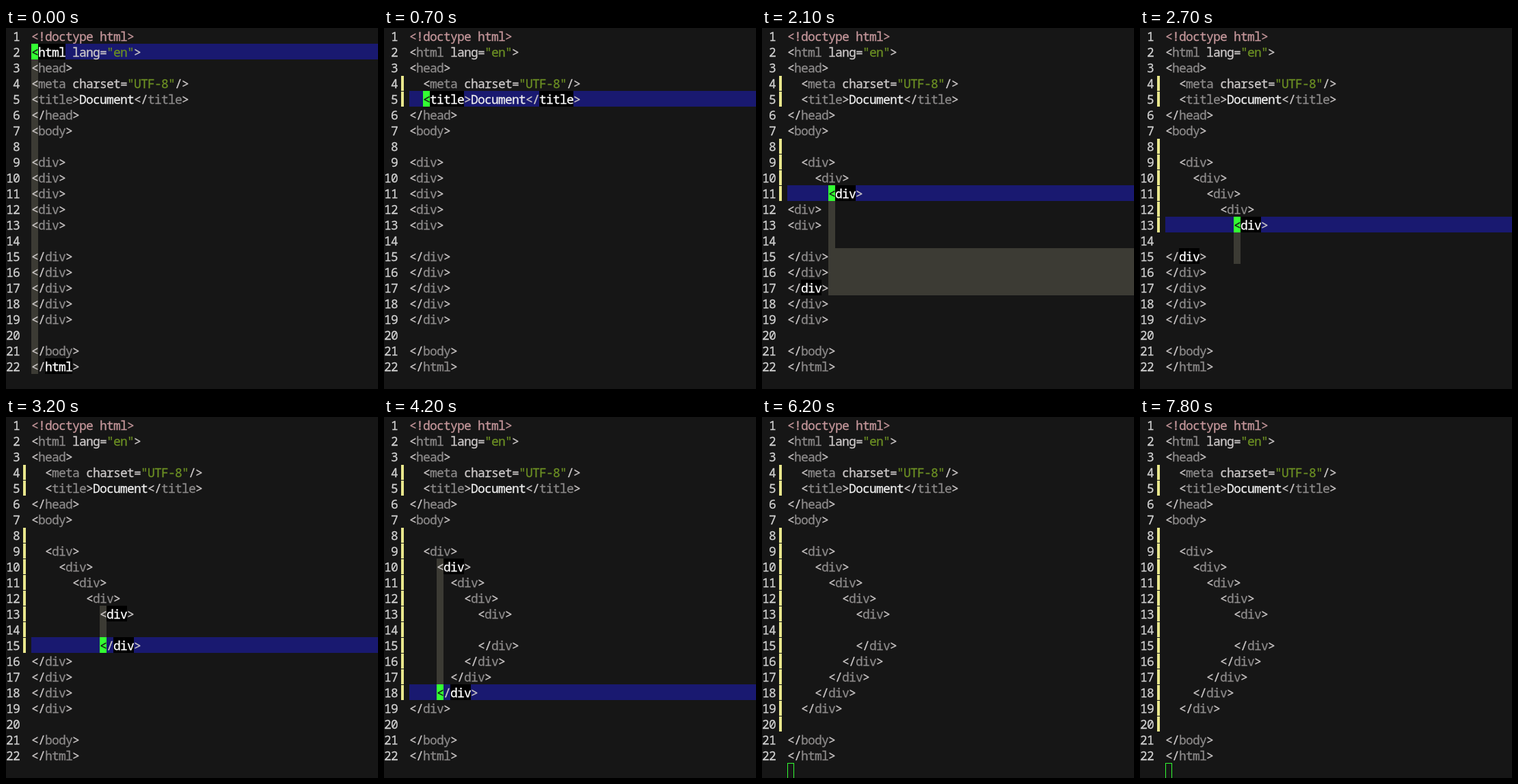
An HTML page for the animation above (7.9 s loop, 544 by 528 pixels).

```html
<!DOCTYPE html>
<html lang="en">
<head>
<meta charset="UTF-8">
<title>Indenting line by line</title>
<style>
html, body { margin: 0; width: 100%; height: 100%; overflow: hidden; background: #161616; }
#editor {
  position: relative; width: 544px; height: 528px; overflow: hidden;
  font: 18px/25px "Noto Sans Mono", "DejaVu Sans Mono", monospace;
  letter-spacing: calc(10px - 1ch);
  -webkit-text-stroke: 0.3px;
  white-space: pre; color: #cdc9c9;
}
.row { position: absolute; left: 0; width: 544px; height: 23px; }
.row > * { position: absolute; top: 0; height: 23px; }
.num { left: 0; width: 20px; text-align: right; color: #d0d0d0; }
.row > .bar { left: 25px; top: 1px; width: 4px; height: 22px; background: #e9e78c; }
.code { left: 37px; }
.here { left: 37px; right: 0; background: #191970; }
.guide { background: #3c3b34; }
.cursor { background: #3f3; color: #161616; width: 10px; }
.hollow { box-sizing: border-box; background: none; border: 1px solid #3f3; }
.name { color: #8b8989; }
.hot { display: inline-block; height: 23px; vertical-align: top; color: #fff; background: #000; }
.string { color: #6b8e23; }
.text { color: #eee; }
.doctype { color: #c4969a; }
</style>
</head>
<body>
<div id="editor"></div>
<script>
const LOOP = 7900, ROW = 23, CELL = 10, LEFT = 37;
const open = Array(5).fill("<div>"), close = Array(5).fill("</div>");
const lines = [
  "<!doctype html>", '<html lang="en">', "<head>", '<meta charset="UTF-8"/>',
  "<title>Document</title>", "</head>", "<body>", "", ...open, "", ...close,
  "", "</body>", "</html>"
];
// Arrival time of the cursor on lines 2 to 23
const moves = [0, 150, 450, 650, 850, 1150, 1350, 1550, 1850, 2050, 2350,
  2550, 2850, 3050, 3350, 3650, 3950, 4250, 4550, 4850, 4950, 5250];
const BLUR = 5750;
const editor = document.getElementById("editor");

function indent(n) {
  if (n === 4 || n === 5 || n === 8 || n === 20) return 2;
  return n > 8 && n < 20 ? 12 - 2 * Math.abs(14 - n) : 0;
}

function partner(n) {
  if (n === 5) return 5;
  if (n === 3 || n === 6) return 9 - n;
  if (n === 2 || n === 22) return 24 - n;
  return lines[n - 1] && n >= 7 && n <= 21 ? 28 - n : 0;
}

const escape = s => s.replace(/</g, "&lt;").replace(/>/g, "&gt;");
const span = (kind, s) => `<span class="${kind}">${escape(s)}</span>`;
const box = (kind, x, style = "", s = "") =>
  `<div class="${kind}" style="left:${x}px;${style}">${escape(s)}</div>`;

function paint(s, hot) {
  if (s.startsWith("<!")) return span("doctype", s);
  return s.replace(/(<\/?)(\w+)|"[^"]*"|\/?>|[^<>"]+/g, (all, bracket, name) => {
    if (name) return escape(bracket) + span(hot ? "hot" : "name", name);
    if (all[0] === '"') return span("string", all);
    return /[>=]/.test(all) ? escape(all) : span("text", all);
  });
}

function row(n, at, blurred) {
  const source = lines[n - 1] || "";
  const numbered = n <= lines.length;
  const pad = n <= at ? indent(n) : 0;
  const col = indent(at);
  const mate = partner(at);
  const first = Math.min(at, mate), last = Math.max(at, mate);
  const x = LEFT + col * CELL;
  let html = "";
  if (n === at) {
    if (numbered) html += '<div class="here"></div>';
  } else if (mate && n >= first && n <= last) {
    // A line ending exactly at the column is shaded up to the edge
    const toEdge = source && pad + source.length === col;
    html += box("guide", x, toEdge ? "right:0" : `width:${CELL}px`);
  }
  if (numbered) html += `<div class="num">${n}</div>`;
  if (pad) html += '<div class="bar"></div>';
  const hot = mate && (n === at || n === mate);
  html += `<div class="code">${" ".repeat(pad)}${paint(source, hot)}</div>`;
  if (n === at) html += box(blurred ? "cursor hollow" : "cursor", x, "", source[0]);
  return `<div class="row" style="top:${(n - 1) * ROW}px">${html}</div>`;
}

function draw(at, blurred) {
  let html = "";
  for (let n = 1; n <= lines.length + 1; n++) html += row(n, at, blurred);
  editor.innerHTML = html;
}

let shown = "";
function tick() {
  const t = performance.now() % LOOP;
  const at = 1 + moves.filter(m => m <= t).length;
  const blurred = t >= BLUR;
  const state = at + "/" + blurred;
  if (state !== shown) draw(at, blurred);
  shown = state;
  requestAnimationFrame(tick);
}
tick();
</script>
</body>
</html>
```
